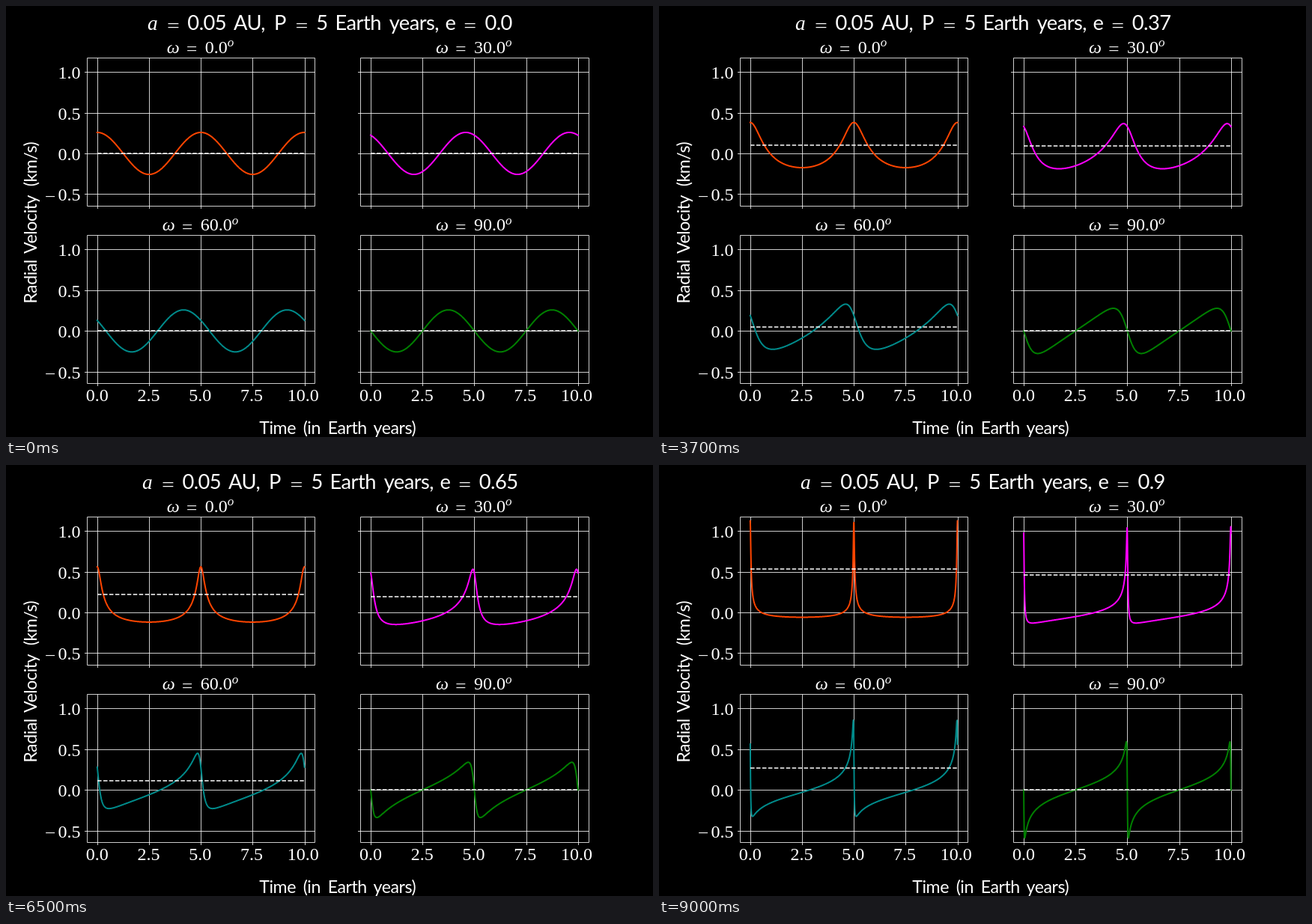
An HTML page for the animation above (9.1 s loop, 864 px wide and 576 px high).

```html
<!DOCTYPE html>
<html lang="en">
<head>
<meta charset="utf-8">
<title>Radial velocity curves</title>
<style>
  html, body { margin: 0; width: 100%; height: 100%; overflow: hidden; background: #000; }
  svg { display: block; width: 864px; height: 576px; }
  text { fill: #fff; font-family: Lato, "Open Sans", sans-serif; letter-spacing: -.02em; }
  .mid { text-anchor: middle; }
  .end { text-anchor: end; }
  .roman, .math { font-family: "Liberation Serif", "Noto Serif", serif; letter-spacing: 0; }
  .math, .sup { font-style: italic; }
  .sign { font-weight: 300; letter-spacing: 0; }
  .frame { fill: none; stroke: #fff; stroke-width: .8; }
  .curve { fill: none; stroke-width: 2; stroke-linejoin: round; stroke-linecap: square; }
  .mean { stroke: #fff; stroke-width: 1.5; stroke-dasharray: 5.55 2.4; }
</style>
</head>
<body>
<svg id="stage" viewBox="0 0 864 576" xmlns="http://www.w3.org/2000/svg"></svg>
<script>
const STEP = 100, STEPS = 91;
const PERIOD = 5, SPAN = 10, SAMPLES = 1000, SPEED = 0.2579;
const W = 304.36, H = 197.67, UNIT_X = W / 1.1 / SPAN, UNIT_Y = 108.8;
const SPACE = 0.333;

const panels = [
  { omega: 0, color: '#ff4500', left: 108, top: 69.12 },
  { omega: 30, color: '#ff00ff', left: 473.24, top: 69.12 },
  { omega: 60, color: '#008b8b', left: 108, top: 306.33 },
  { omega: 90, color: '#008000', left: 473.24, top: 306.33 }
];
for (const p of panels) {
  p.angle = p.omega * Math.PI / 180;
  p.x = t => p.left + W / 22 + t * UNIT_X;
  p.y = v => p.top + 127.88 - v * UNIT_Y;
}

const snap = v => Math.floor(v + 0.5);
const crisp = v => snap(v) + 0.5;
const numberWidth = s => 0.5 * (s.length - 1) + 0.278;

function text(str, x, y, size, cls) {
  return `<text class="${cls}" x="${x.toFixed(2)}" y="${y.toFixed(2)}" font-size="${size}">${str}</text>`;
}

// Operators sit on the math axis and are wider than the digits.
function sign(str, x, y, em) {
  return text(str, x, y + em * 0.18, em * 1.2, 'mid sign');
}

// Centres a row of words: [text, width in em, class].
function row(words, em, size, cx, y) {
  const total = words.reduce((sum, w) => sum + w[1], SPACE * (words.length - 1));
  let x = cx - total * em / 2;
  return words.map(([str, width, cls = '']) => {
    const mid = x + width * em / 2;
    x += (width + SPACE) * em;
    return str === '=' ? sign(str, mid, y, em) : text(str, mid, y, size, 'mid ' + cls);
  }).join('');
}

function title(e) {
  return row([
    ['a', 0.529, 'math'], ['=', 0.778], ['0.05', 1.778], ['AU,', 1.633],
    ['P', 0.639], ['=', 0.778], ['5', 0.5], ['Earth', 2.298], ['years,', 2.389],
    ['e', 0.444], ['=', 0.778], [e, numberWidth(e)]
  ], 27.85, 27.3, 432, 32);
}

function axes(p) {
  const l = crisp(p.left), r = crisp(p.left + W), t = crisp(p.top), b = crisp(p.top + H);
  const lower = p.top > 200, first = p.left < 200;
  let d = `M${l} ${t}H${r}V${b}H${l}Z`, labels = '';
  for (let v = 0; v <= SPAN; v += 2.5) {
    const x = p.x(v);
    d += `M${crisp(x)} ${t}V${b + 3.5}`;
    if (lower) labels += text(v.toFixed(1), x - v * 0.18, 528, 24, 'mid roman');
  }
  for (let v = -0.5; v <= 1; v += 0.5) {
    const y = p.y(v);
    d += `M${l - 3.5} ${crisp(y)}H${r}`;
    if (!first) continue;
    labels += text(Math.abs(v).toFixed(1), 99.5, y + 9, 24, 'end roman');
    if (v < 0) labels += sign('−', 59, y + 9, 24);
  }
  const deg = p.omega.toFixed(1);
  const head = row([
    ['ω', 0.622, 'math'], ['=', 0.778],
    [`${deg}<tspan class="sup" dy="-8.7" font-size="17">o</tspan>`, numberWidth(deg) + 0.36, 'roman']
  ], 24, 24, p.left + W / 2, p.top - 6.1);
  return `<path class="frame" d="${d}"/>${labels}${head}` +
    `<path class="curve" stroke="${p.color}"/><path class="mean"/>`;
}

function trueAnomaly(t, e) {
  const M = (t / PERIOD % 1) * 2 * Math.PI;
  let E = e < 0.5 ? M : Math.PI;
  for (let i = 0; i < 20; i++) E -= (E - e * Math.sin(E) - M) / (1 - e * Math.cos(E));
  return Math.atan2(Math.sqrt(1 - e * e) * Math.sin(E), Math.cos(E) - e);
}

const stage = document.getElementById('stage');
const xLabel = row([['Time', 2.144], ['(in', 1.145], ['Earth', 2.298], ['years)', 2.5]],
  23.1, 23.2, 442.8, 572);
const yLabel = row([['Radial', 2.603], ['Velocity', 3.355], ['(km/s)', 2.944]],
  23.1, 23.2, 0, 0);
stage.innerHTML = '<rect width="864" height="576"/><g id="title"></g>' +
  panels.map(axes).join('') + xLabel +
  `<g transform="translate(40.5 288) rotate(-90)">${yLabel}</g>`;

const heading = document.getElementById('title');
const curves = stage.querySelectorAll('.curve');
const means = stage.querySelectorAll('.mean');

function draw(n) {
  const e = n / 100, K = SPEED / Math.sqrt(1 - e * e);
  heading.innerHTML = title(e.toFixed(n % 10 ? 2 : 1));
  const points = Array.from({ length: SAMPLES }, (_, i) => {
    const t = SPAN * i / (SAMPLES - 1);
    return [t, trueAnomaly(t, e)];
  });
  panels.forEach((p, i) => {
    const mean = K * e * Math.cos(p.angle);
    const line = points.map(([t, nu]) =>
      p.x(t).toFixed(2) + ' ' + p.y(K * Math.cos(nu + p.angle) + mean).toFixed(2));
    curves[i].setAttribute('d', 'M' + line.join('L'));
    means[i].setAttribute('d', `M${snap(p.x(0))} ${snap(p.y(mean))}H${snap(p.x(SPAN))}`);
  });
}

let shown = -1;
function tick() {
  const n = Math.floor(performance.now() / STEP) % STEPS;
  if (n !== shown) draw(shown = n);
  requestAnimationFrame(tick);
}
tick();
</script>
</body>
</html>
```
